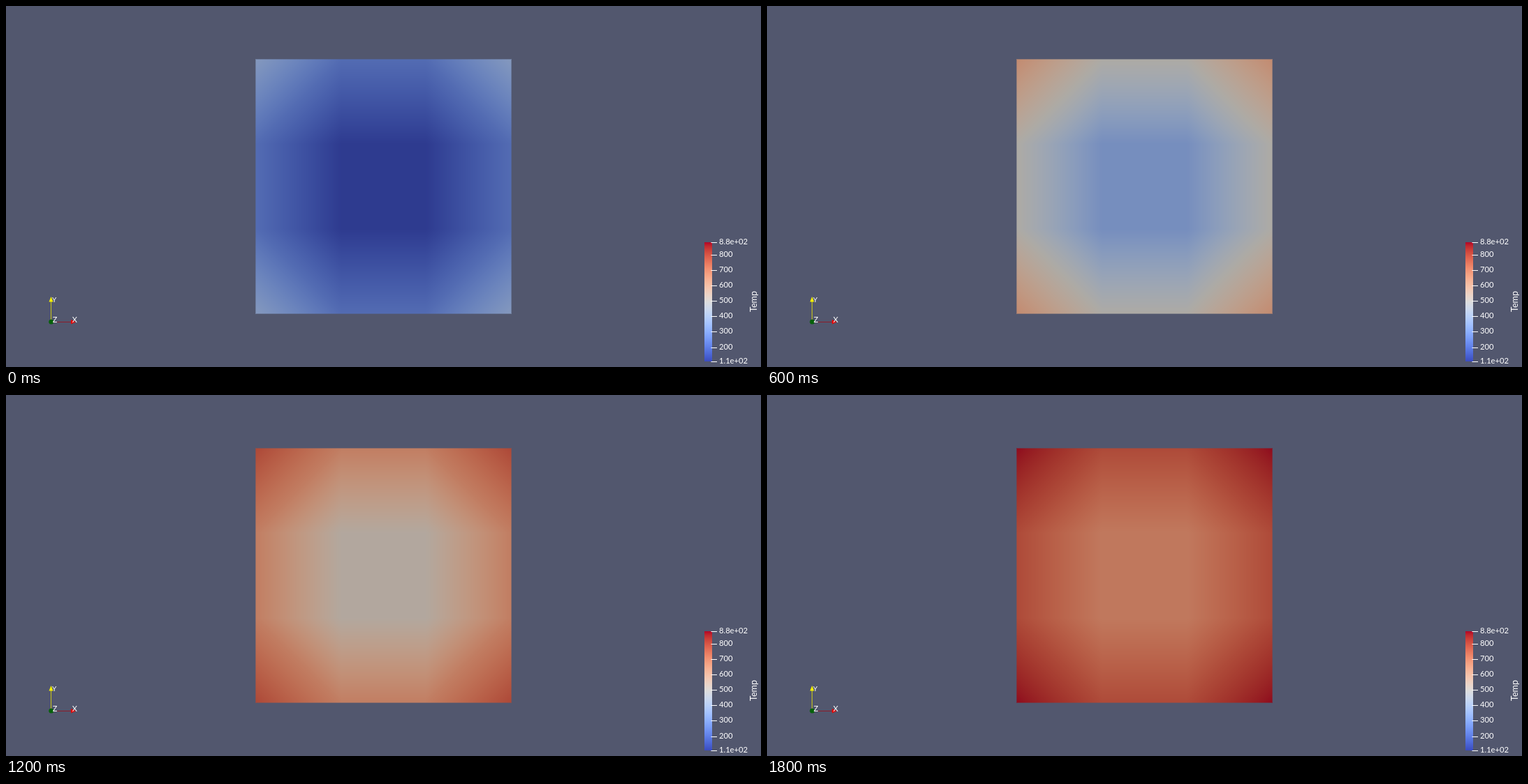
Recreate the animation shown at these times as an HTML page with a canvas. Size 1081x518 px, loop 2 s.

```html
<!DOCTYPE html>
<html lang="en">
<head>
<meta charset="utf-8">
<title>Temperature field</title>
<style>
  html, body { margin: 0; width: 100%; height: 100%; overflow: hidden; background: #52576e; }
  canvas, svg { position: absolute; left: 0; top: 0; display: block; }
  text { font-family: Lato, Inter, sans-serif; fill: #fff; }
</style>
</head>
<body>
<canvas id="field" width="1081" height="518"></canvas>
<svg width="1081" height="518" viewBox="0 0 1081 518">
  <defs><linearGradient id="ramp" x1="0" y1="1" x2="0" y2="0"></linearGradient></defs>
  <rect x="1000" y="339" width="11" height="171" fill="url(#ramp)"/>
  <g id="scale" font-size="11.2"></g>
  <text transform="translate(1075 424) rotate(-90)" font-size="12.6" text-anchor="middle">Temp</text>
  <path d="M67 453.5H94" stroke="#8c1c2a"/>
  <path d="M93 450L100 453.5L93 456.5Z" fill="#e00808"/>
  <path d="M64.5 453V424" stroke="#c9c516"/>
  <path d="M61.5 424.5L64.5 417L67.5 424.5Z" fill="#f4f000"/>
  <circle cx="64.7" cy="453.2" r="3.4" fill="#06610a"/>
  <g text-anchor="middle">
    <text x="69" y="424.5" font-size="10">Y</text>
    <text x="70" y="453.5" font-size="11">Z</text>
    <text x="98.3" y="453.5" font-size="11">X</text>
  </g>
</svg>
<script>
const LOW = 110, HIGH = 880;
const STEP = 200, STEPS = 10;
const LIGHT = [0.785, 0.77, 0.745]; // slightly warm lamp on the face
const BOX = { x: 357, y: 76, w: 367, h: 366, cell: 122 };

const mix = (a, b, k) => a + (b - a) * k;

// Normalised heat of the mesh nodes after n steps
const centreHeat = n => 0.097 * n - 0.0016 * n * n;
const sideHeat = n => 1.15 - 0.866 ** n;
const cornerHeat = n => 1.15 - 0.82 * 0.83 ** n;

function labToRgb(L, a, b) {
  const cube = v => v > 6 / 29 ? v ** 3 : 3 * (6 / 29) ** 2 * (v - 4 / 29);
  const gamma = v => v > 0.0031308 ? 1.055 * v ** (1 / 2.4) - 0.055 : 12.92 * v;
  const f = (L + 16) / 116;
  const x = 0.9505 * cube(f + a / 500), y = cube(f), z = 1.089 * cube(f - b / 200);
  return [
    3.2406 * x - 1.5372 * y - 0.4986 * z,
    -0.9689 * x + 1.8758 * y + 0.0415 * z,
    0.0557 * x - 0.204 * y + 1.057 * z
  ].map(v => 255 * Math.min(1, Math.max(0, gamma(v))));
}

// Diverging cool-to-warm map: grey in the middle, hue turning towards each end
function color(t) {
  const p = 2 * Math.min(1, Math.max(0, t)) - 1, k = Math.abs(p);
  const size = mix(88, 80, k), sat = 1.08 * k;
  const hue = p < 0 ? mix(-1.661, -1.1, k) : mix(1.061, 0.5, k);
  const chroma = size * Math.sin(sat);
  return labToRgb(size * Math.cos(sat), chroma * Math.cos(hue), chroma * Math.sin(hue));
}

const ctx = document.getElementById('field').getContext('2d');
const image = ctx.createImageData(BOX.w, BOX.h);

// Distance outside the middle cell, in cells
const reach = (i, size) =>
  Math.max(0, (Math.abs(i + 0.5 - size / 2) - BOX.cell / 2) / BOX.cell);

function drawField(n) {
  const centre = centreHeat(n), side = sideHeat(n), corner = cornerHeat(n);
  const fine = 500, shades = [];
  for (let i = 0; i <= 2 * fine + 10; i++) {
    const s = i / fine;
    const t = s < 1 ? mix(centre, side, s) : mix(side, corner, s - 1);
    shades.push(color(t).map((c, j) => c * LIGHT[j]));
  }
  let k = 0;
  for (let y = 0; y < BOX.h; y++) {
    const v = reach(y, BOX.h);
    for (let x = 0; x < BOX.w; x++) {
      const c = shades[Math.round((v + reach(x, BOX.w)) * fine)];
      image.data[k++] = c[0];
      image.data[k++] = c[1];
      image.data[k++] = c[2];
      image.data[k++] = 255;
    }
  }
  ctx.putImageData(image, BOX.x, BOX.y);
  // Soft outer edge
  ctx.strokeStyle = 'rgba(82, 87, 110, 0.4)';
  ctx.strokeRect(BOX.x + 0.5, BOX.y + 0.5, BOX.w - 1, BOX.h - 1);
}

function add(parent, name, attrs, text) {
  const el = document.createElementNS('http://www.w3.org/2000/svg', name);
  for (const key in attrs) el.setAttribute(key, attrs[key]);
  if (text) el.textContent = text;
  parent.append(el);
}

function buildLegend() {
  const ramp = document.getElementById('ramp');
  for (let i = 0; i <= 32; i++) {
    add(ramp, 'stop', { offset: i / 32, 'stop-color': `rgb(${color(i / 32).map(Math.round)})` });
  }
  const scale = document.getElementById('scale');
  const mark = (value, label) => {
    const y = Math.floor(mix(510, 339.5, (value - LOW) / (HIGH - LOW))) + 0.5;
    add(scale, 'path', { d: `M1009.5 ${y}H1018`, stroke: '#fff' });
    add(scale, 'text', { x: 1021, y: y + 2.8 }, label);
  };
  mark(HIGH, '8.8e+02');
  for (let v = 800; v >= 200; v -= 100) mark(v, String(v));
  mark(LOW, '1.1e+02');
}

let shown = -1;
function tick() {
  const step = Math.floor(performance.now() / STEP) % STEPS;
  if (step !== shown) {
    shown = step;
    drawField(step);
  }
  requestAnimationFrame(tick);
}

buildLegend();
tick();
</script>
</body>
</html>
```
